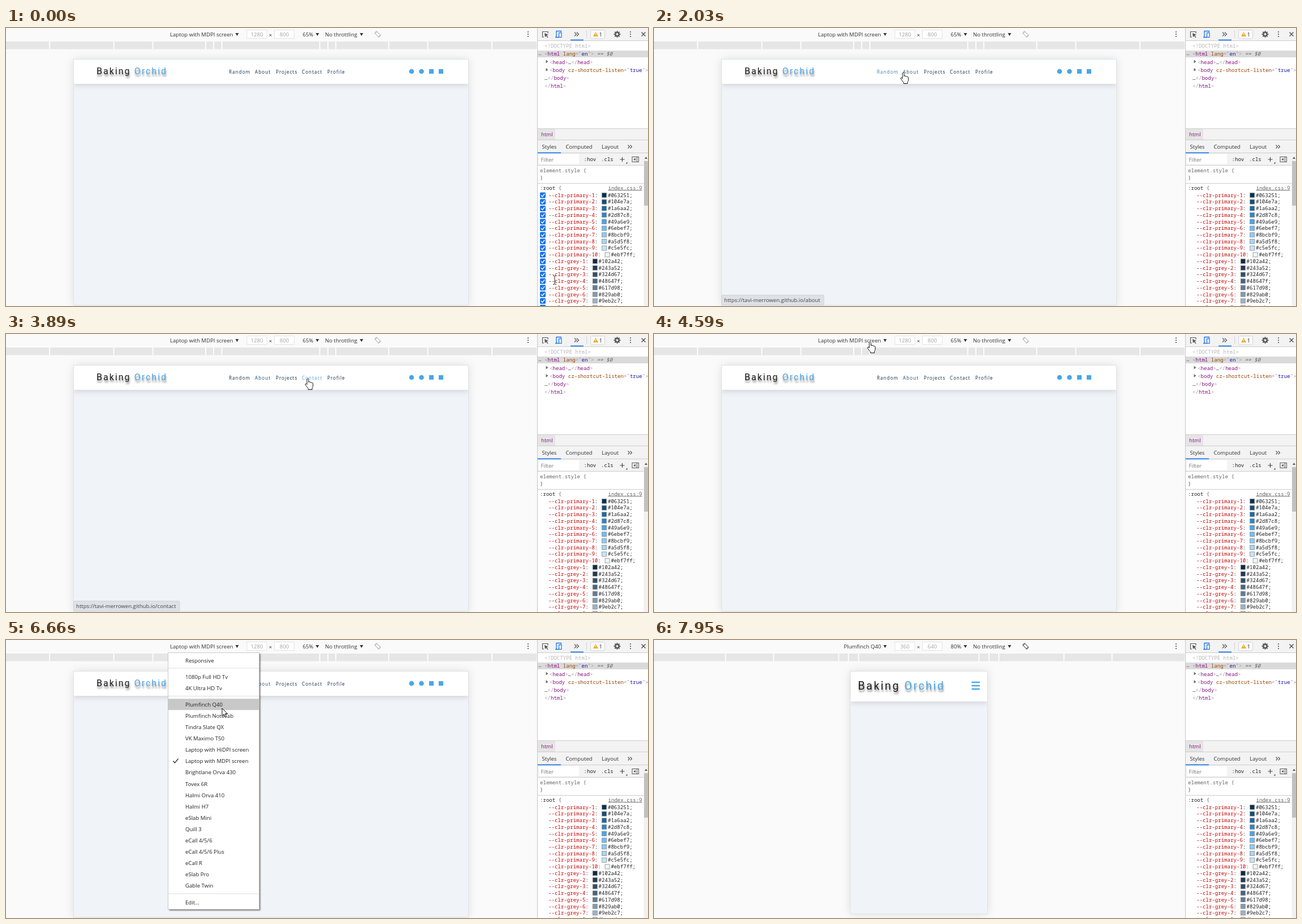
An HTML page for the animation above (8 s loop, 1135 px wide and 493 px high).

```html
<!DOCTYPE html>
<html lang="en">
<head>
<meta charset="utf-8">
<title>Responsive navbar</title>
<style>
html, body { margin: 0; width: 100%; height: 100%; overflow: hidden; background: #fafafa; }
#stage { display: block; width: 1135px; height: 493px; }
text { font: 9.6px "Open Sans", sans-serif; fill: #333; white-space: pre; }
.mono { font: 9.1px "Noto Sans Mono", monospace; }
.nav { font-size: 8.2px; letter-spacing: 1px; fill: #102a42; }
.logo text { font-family: Roboto, sans-serif; }
.logo { filter: drop-shadow(1px 4px 1.5px rgba(0, 0, 0, .45)); }
.page { filter: drop-shadow(0 0 8px rgba(0, 0, 0, .13)); }
.head { filter: drop-shadow(0 3px 5px rgba(0, 0, 0, .13)); }
.menu { filter: drop-shadow(2px 2px 1px rgba(0, 0, 0, .55)); }
.mid { text-anchor: middle; }
.end { text-anchor: end; }
</style>
</head>
<body>
<svg id="stage" viewBox="0 0 1135 493"></svg>
<script>
const BLUE = '#49a6e9', ACCENT = '#1a73e8';
const stage = document.getElementById('stage');

const rect = (x, y, w, h, fill, more = '') =>
  `<rect x="${x}" y="${y}" width="${w}" height="${h}" fill="${fill}" ${more}/>`;
const text = (x, y, s, more = '') => `<text x="${x}" y="${y}" ${more}>${s}</text>`;
const mono = (x, y, s, fill = '#222') => text(x, y, s, `class="mono" style="fill:${fill}"`);
const path = (d, stroke, width = 1, fill = 'none') =>
  `<path d="${d}" stroke="${stroke}" stroke-width="${width}" fill="${fill}"/>`;
const dot = (x, y, r, fill) => `<circle cx="${x}" cy="${y}" r="${r}" fill="${fill}"/>`;
const group = (id, body, more = '') => `<g id="${id}" ${more}>${body}</g>`;
const caret = x => path(`M${x - 3} 9h6l-3 5z`, 'none', 0, '#333');
const kebab = x => [7, 11, 15].map(y => dot(x, y, 1.1, '#555')).join('');
const span = (s, fill) => `<tspan fill="${fill}" style="fill:${fill}">${s}</tspan>`;

/* Device toolbar and media query ruler */
const TICKS = [86.5, 101, 115, 208.5, 277.5, 391];

function ruler(scale) {
  const marks = TICKS.flatMap(d => [468 - d * scale, 468 + d * scale])
    .map(x => rect(x - .8, 24, 1.8, 13.5, '#fff'));
  return rect(0, 24, 938, 13.5, '#e6e6e6') + marks.join('');
}

function toolbar(device, w, h, zoom, rotateColor) {
  const field = (x, s) => rect(x, 3.5, 35, 15, '#fff', 'stroke="#e3e3e3"') +
    text(x + 17.5, 15, s, 'class="mid" style="fill:#a2a2a2"');
  return text(401.5, 15, device, 'class="end"') + caret(408.5) +
    field(426, w) + text(467.5, 15.5, '×', 'class="mid"') + field(474.5, h) +
    text(524.5, 15, zoom) + caret(550.5) + text(564, 15, 'No throttling') + caret(628.5) +
    `<g transform="translate(657 11) rotate(-45)">` +
    rect(-2.3, -4.2, 4.6, 8.4, 'none', `rx="1" stroke="${rotateColor}"`) + '</g>' +
    path('M651.500 10a5.500 5.500 0 0 1 5-4.500M662.500 12a5.500 5.500 0 0 1-5 4.500', rotateColor) +
    kebab(923);
}

/* Web page inside the device frame */
function page(x, w, h, headH, scale, logoX, extra) {
  const word = (dx, s, fill) => text(logoX + dx * scale, 82.3 - 56 + 6.1 * (scale - 1) / .231, s,
    `style="font-size:${16 * scale}px;letter-spacing:${2 * scale}px;fill:${fill}"`);
  return rect(x, 56, w, h, '#f0f4f8', 'class="page"') +
    `<svg x="${x}" y="56" width="${w}" height="${h}">` +
    rect(0, 0, w, headH, '#fff', 'class="head"') +
    `<g class="logo">${word(0, 'Baking', '#1f1f1f')}${word(66.7, 'Orchid', BLUE)}</g></svg>` +
    rect(x - .5, 55.5, w + 1, h + 1, 'none', 'stroke="#dfe4e8"') + extra;
}

const LINKS = [
  { name: 'Random', x: 394, on: 1010, off: 1870, rest: 0 },
  { name: 'About', x: 440, on: 1900, off: 2640, rest: .3 },
  { name: 'Projects', x: 477, on: 2690, off: 3400, rest: 0 },
  { name: 'Contact', x: 523, on: 3450, off: 4190, rest: 0 },
  { name: 'Profile', x: 568, on: 9000, off: 9000, rest: 0 }
];
const nav = LINKS.map(l => text(l.x, 81, l.name, 'class="nav"')).join('');
const social = dot(717, 77, 4.3, BLUE) + dot(734.5, 77, 4.3, BLUE) +
  rect(748, 73, 8, 8, BLUE) + rect(765, 73, 8, 8, BLUE);
const burger = [75, 81, 87].map(y => rect(561.5, y - 1.2, 14.5, 2.4, BLUE, 'rx=".8"')).join('');

/* Device menu */
const MENU = [
  [36, 'Responsive'], [65, '1080p Full HD Tv'], [85, '4K Ultra HD Tv'],
  ...['Plumfinch Q40', 'Plumfinch NoteTab', 'Tindra Slate QX', 'VK Maximo T50',
    'Laptop with HiDPI screen', 'Laptop with MDPI screen', 'Brightlane Orva 430', 'Tovex 6R',
    'Halmi Orva 410', 'Halmi H7', 'eSlab Mini', 'Quill 3', 'eCall 4/5/6', 'eCall 4/5/6 Plus',
    'eCall R', 'eSlab Pro', 'Gable Twin'].map((s, i) => [114.2 + 20.1 * i, s]),
  [465, 'Edit...']
];
const menu = rect(286.500, 22.5, 161, 455, '#fff', 'class="menu"') +
  rect(286.5, 22.5, 161, 455, 'none', 'stroke="#c8c8c8"') +
  rect(287, 104, 160.5, 20, '#c8c8c8', 'id="pick"') +
  [50, 99.5, 450].map(y => rect(287, y - .5, 160, 1, '#ddd')).join('') +
  MENU.map(([y, s]) => text(317, y + 3.6, s, 'style="fill:#222"')).join('') +
  path('M295.500 214.500l3 3.500 6-7.500', '#333', 1.4);

/* Developer tools panel */
const COLORS = ('063251 104e7a 1a6aa2 2d87c8 49a6e9 6ebef7 8bcbf9 a5d5f8 c5e5fc ebf7ff ' +
  '102a42 243a52 324d67 48647f 617d98 829ab0 9eb2c7 bcccdc').split(' ');
const rowY = i => 296.5 + 11.72 * i;

const rules = COLORS.map((c, i) => {
  const name = i < 10 ? `--clr-primary-${i + 1}` : `--clr-grey-${i - 9}`;
  const x = 959 + 5.46 * (name.length + 1) + 7.3, y = rowY(i);
  return mono(959, y + 3.2, span(name, '#c80000') + ':') +
    rect(x, y - 4, 8, 8, '#' + c, 'stroke="#888" stroke-width=".8"') +
    mono(x + 10.300, y + 3.2, `#${c};`);
}).join('');

const checks = COLORS.map((c, i) => rect(944, rowY(i) - 5, 10, 10, ACCENT, 'rx="1.5"') +
  path(`M946 ${rowY(i)}l2.300 2.500 4-5`, '#fff', 1.4)).join('');

function panel() {
  const tag = s => span(s, '#a894a6'), name = s => span(s, '#881280');
  const attr = s => span(s, '#994500'), value = s => span(s, '#1a1aa6');
  const node = y => path(`M954.500 ${y - 3}v6l4-3z`, 'none', 0, '#6e6e6e');
  const line = y => rect(940, y, 195, 1, '#ccc');
  const teeth = Array.from({ length: 8 }, (_, i) =>
    `<g transform="rotate(${i * 45} 1080.5 11)">${rect(1079.4, 5.2, 2.2, 3, '#555')}</g>`).join('');
  return rect(939, 0, 196, 493, '#fff') + rect(940, 0, 195, 22, '#f3f3f3') + line(22) +
    path('M951 16h-2.500v-9.500h9.500v3', '#555', 1.2) + path('M952 9l7 3-3 1 2.500 3.500-1 1-2.500-3.500-2 2z', 'none', 0, '#555') +
    path('M973 16v-10.500h8.500v2M971 16.500h6', ACCENT, 1.3) + rect(977.5, 8.5, 4.5, 8, 'none', `stroke="${ACCENT}" stroke-width="1.2"`) +
    path('M1005 7.500l3.500 3.500-3.500 3.500M1009 7.500l3.500 3.500-3.500 3.500', '#555', 1.2) + rect(998, 20.5, 23, 1.6, ACCENT) +
    rect(1033.5, 3.5, 25, 15.5, '#f9f9f9', 'rx="2" stroke="#d5d5d5"') +
    path('M1038 15l4.500-8 4.500 8z', 'none', 0, '#f2ab26') + rect(1042, 9.500, 1, 3, '#fff') + text(1048.5, 15, '1') +
    rect(1026, 4, 1, 14, '#d5d5d5') + teeth + `<circle cx="1080.5" cy="11" r="3" fill="none" stroke="#555" stroke-width="2"/>` + kebab(1104) +
    path('M1123.500 7.500l7 7m0-7l-7 7', '#444', 1.2) +
    mono(952, 35, '&lt;!DOCTYPE html&gt;', '#b5b5b5') +
    rect(940, 40, 195, 12, '#dadada') + mono(941, 48, '…', '#555') +
    mono(952, 49, tag('&lt;') + name('html ') + attr('lang') + tag('="') + value('en') + tag('"&gt;') + `<tspan font-style="italic" style="fill:#666"> == $0</tspan>`) +
    node(59.5) + mono(961, 63.5, tag('&lt;') + name('head') + tag('&gt;') + '…' + tag('&lt;/') + name('head') + tag('&gt;')) +
    node(74) + mono(961, 77.5, tag('&lt;') + name('body ') + attr('cz-shortcut-listen') + tag('="') + value('true') + tag('"&gt;')) +
    mono(952, 91.5, '…' + tag('&lt;/') + name('body') + tag('&gt;')) +
    mono(952, 105.5, tag('&lt;/') + name('html') + tag('&gt;')) +
    rect(940, 178, 195, 66, '#f3f3f3') + line(178) + rect(940, 179, 31, 19, '#e5e5e5') +
    text(946, 192, 'html', 'style="fill:#881280"') + line(198) +
    text(947.5, 214, 'Styles') + text(989.5, 214, 'Computed') + text(1053, 214, 'Layout') +
    path('M1099.500 207.500l3 3-3 3M1103.500 207.500l3 3-3 3', '#555', 1.2) + line(221) + rect(940, 220.5, 41, 1.7, ACCENT) +
    rect(942, 224, 71, 17.5, '#fff') + text(945.5, 236.5, 'Filter', 'style="fill:#777"') +
    mono(1021.500, 236, ':hov') + mono(1052, 236, '.cls') + path('M1085.500 233h8m-4-4v8', '#444', 1.2) +
    path('M1098.500 237.500v3h-3z', 'none', 0, '#444') +
    rect(1107, 228.5, 11.500, 9, 'none', 'stroke="#555"') + path('M1115.500 228.500v9', '#555') + path('M1113 230.500v5l-3.500-2.500z', 'none', 0, '#555') +
    line(243) + mono(944, 255.5, 'element.style {', '#666') + mono(944, 269, '}', '#555') + line(275) +
    mono(944, 286.5, ':root ' + span('{', '#666')) + text(1064.500, 286.5, 'index.css:9', 'class="mono" style="fill:#666;text-decoration:underline"') +
    rules + group('checks', checks) +
    rect(1127.500, 226, 7.5, 267, '#f1f1f1') + rect(1128, 236, 7, 79, '#c1c1c1') +
    path('M1129 232l2.500-3.500 2.500 3.500z', 'none', 0, '#555') + rect(939, 0, 1, 493, '#c6c6c6');
}

/* Pointers, each with its hot spot at the origin */
const arrow = path('M0 0v13.500l3.200-2.900 2.300 5.400 2.200-.9-2.300-5.300h4.300z', '#111', 1, '#fff');
const hand = path('M-1.500 1.500c0-2 3-2 3 0v5c.5-1.500 2.600-1 2.700.5.800-1 2.400-.5 2.500.8 1-.8 2.400-.2 2.400 1.200v4c0 2-1 3-1.500 4v2.500h-7v-2c-1.500-1.500-3-4-5-6.500-.8-1.600 1.200-2.600 2.300-1.300l.6.800z', '#111', 1, '#fff');
const beam = path('M-3 -7.500h2.300l.7.800.7-.8h2.300M0-6.500v13M-3 7.500h2.300l.7-.8.7.8h2.300', '#222', 1);

stage.innerHTML = rect(0, 0, 940, 493, '#fafafa') +
  group('wide', ruler(1) + toolbar('Laptop with MDPI screen', 1280, 800, '65%', '#b5b5b5') +
    page(120, 697, 435, 43, 1, 40, nav + social)) +
  group('phone', ruler(80 / 65) + toolbar('Plumfinch Q40', 360, 640, '80%', '#555') +
    page(347.5, 241.5, 429, 53, 80 / 65, 13, burger)) +
  group('status', rect(119.500, 473.5, 192, 18, '#dee1e6', 'id="pill" rx="2" stroke="#cfd3d8"') +
    text(124, 486, '', 'id="url" style="fill:#444"')) +
  group('menu', menu) + panel() +
  group('touch', dot(0, 0, 9, '#555')) +
  group('arrow', arrow) + group('hand', hand) + group('beam', beam);

const el = id => document.getElementById(id);
const show = (id, on) => { el(id).style.display = on ? '' : 'none'; };
const clamp = v => Math.max(0, Math.min(1, v));
const navText = [...document.querySelectorAll('.nav')];

/* Start, end and step count of each burst of changes */
const BURSTS = [
  [100, 830, 11], [930, 1680, 10], [1780, 2500, 9], [2600, 3360, 9], [3460, 4190, 9],
  [4290, 5020, 10], [5120, 5880, 10], [5980, 6690, 10], [6790, 7550, 12], [7650, 7950, 4]
];

function hold(t) {
  const burst = BURSTS.filter(b => b[0] <= t).pop();
  if (!burst) return 0;
  const [a, b, n] = burst, step = (b - a) / (n - 1);
  return Math.min(b, a + Math.floor((t - a) / step + 1e-6) * step);
}

/* time, x, y of the pointer */
const ROUTE = [
  [0, 970, 447], [100, 969, 445], [400, 830, 300], [650, 560, 150], [830, 478, 116],
  [930, 477, 115], [1010, 428, 79], [1100, 428, 79], [1680, 422, 79], [1780, 424, 79],
  [2050, 449, 79], [2500, 453, 79], [2600, 458, 78], [2800, 482, 78], [2970, 490, 77],
  [3100, 490, 77], [3360, 520, 78], [3460, 528, 79], [3980, 536, 79], [4190, 500, 30],
  [4290, 450, 22], [4530, 382, 14], [4620, 382, 14], [5020, 384, 13], [5120, 387, 60],
  [5200, 391, 108], [5300, 391, 108], [5880, 385, 118], [5980, 384, 120], [6300, 383, 126],
  [6600, 382, 121], [7060, 382, 121], [7550, 560, 81], [7650, 562, 81], [7950, 564, 81]
];

function pointAt(t) {
  const i = Math.max(1, ROUTE.findIndex(p => p[0] >= t));
  const [t0, x0, y0] = ROUTE[i - 1], [t1, x1, y1] = ROUTE[i];
  const k = clamp((t - t0) / (t1 - t0));
  return [x0 + (x1 - x0) * k, y0 + (y1 - y0) * k];
}

const STATUS = [[0, ''], [1180, 'random'], [1860, ''], [1950, 'about'], [2690, 'projects'],
  [3460, 'contact'], [4450, '']];
const MENU_OPEN = 4770, MENU_CLOSE = 6850, RESIZE = 7060;
const FROM = [16, 42, 66], TO = [73, 166, 233];

function draw(now) {
  const t = hold(now);
  const [x, y] = pointAt(t);
  const open = t >= MENU_OPEN && t < MENU_CLOSE, phone = t >= RESIZE;

  show('wide', !phone);
  show('phone', phone);
  show('menu', open);
  show('checks', x > 940);

  const row = MENU.find(m => Math.abs(m[0] - y) <= 10.05);
  show('pick', open && row);
  if (row) el('pick').setAttribute('y', row[0] - 10);

  LINKS.forEach((l, i) => {
    const out = clamp((t - l.off) / 300);
    const k = clamp((t - l.on + 40) / 300) * (1 - out * (1 - l.rest));
    navText[i].style.fill = `rgb(${FROM.map((c, j) => Math.round(c + (TO[j] - c) * k))})`;
  });

  const route = STATUS.filter(s => s[0] <= t).pop()[1];
  show('status', route);
  const url = 'https://tavi-merrowen.github.io/' + route;
  if (el('url').textContent !== url) {
    el('url').textContent = url;
    if (route) el('pill').setAttribute('width', el('url').getComputedTextLength() + 11);
  }

  const kind = x > 940 ? 'beam' : phone ? 'touch' : t < 1000 || t >= MENU_OPEN ? 'arrow' : 'hand';
  ['beam', 'touch', 'arrow', 'hand'].forEach(k => show(k, k === kind));
  el(kind).setAttribute('transform', `translate(${x} ${y})`);
  el('touch').style.opacity = t >= 7949 ? 0 : .1;
}

const start = performance.now();
function tick() {
  draw((performance.now() - start) % 8000);
  requestAnimationFrame(tick);
}
draw(0);
tick();
</script>
</body>
</html>
```
